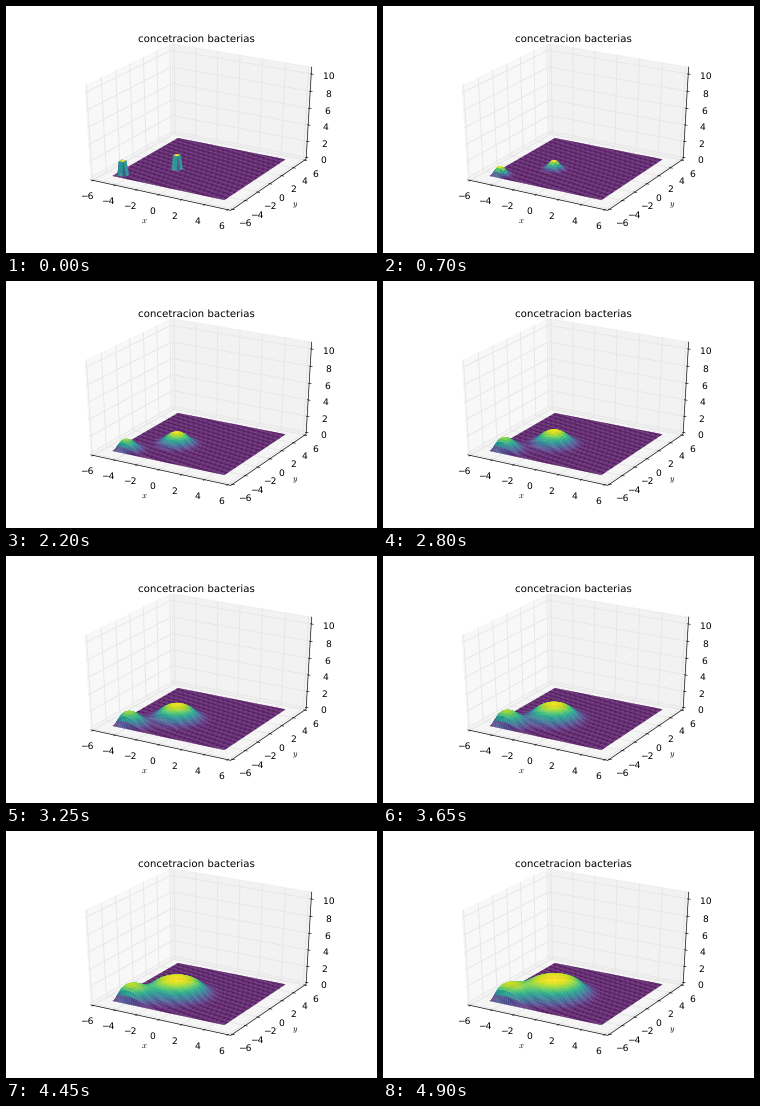
Recreate the animation shown at these times as a matplotlib script. Size 371x247 px, loop 4.95 s.

```python
import numpy as np
import matplotlib.pyplot as plt
from matplotlib import colormaps
from matplotlib.animation import FuncAnimation
from matplotlib.collections import LineCollection, PolyCollection

W, H, DPI = 371, 247, 64
PT = W / 432 * 72 / DPI            # scale of a point on this stage
FRAMES, INTERVAL = 99, 50
Z_TOP = 10.6

plt.rcParams["font.family"] = "DejaVu Sans"
plt.rcParams["text.hinting"] = "no_hinting"
fig = plt.figure(figsize=(W / DPI, H / DPI), dpi=DPI, facecolor="white")
ax = fig.add_axes([0.125, 0.125, 0.775, 0.775])
ax.set_xlim(-0.095, 0.09)
ax.set_ylim(-0.095, 0.09)
ax.set_axis_off()

# --- camera: unit cube centred on the origin, perspective from distance 10
ELEV, AZIM, DIST = np.radians(30), np.radians(-60), 10
TOWARD = np.array([np.cos(AZIM) * np.cos(ELEV), np.sin(AZIM) * np.cos(ELEV), np.sin(ELEV)])
RIGHT = np.array([-np.sin(AZIM), np.cos(AZIM), 0])
UP = np.cross(TOWARD, RIGHT)


def project(p):
    p = np.asarray(p, float)
    depth = DIST - p @ TOWARD
    return np.stack([p @ RIGHT / depth, p @ UP / depth], axis=-1)


# --- box: panes, axes, grid, ticks
DELTA = 1 / 12
EDGE = 0.5 + DELTA / 4
PAD = 48 / (72 * (0.775 * 6 + 0.775 * 4)) * DELTA   # cube units per point
BACK = np.array([-EDGE, EDGE, -EDGE])               # corner where the panes meet


def flipped(p, i):
    q = p.copy()
    q[i] = -q[i]
    return q


def pushed_out(p, along, points):
    step = np.sign(p) * points * PAD
    step[along] = 0
    return p + step


def draw_pane(i, grey):
    a, b = [k for k in range(3) if k != i]
    corners = [BACK, flipped(BACK, a), flipped(flipped(BACK, a), b), flipped(BACK, b)]
    ax.add_collection(PolyCollection([project(corners)], facecolors=[(grey,) * 3 + (0.5,)],
                                     edgecolors=[(grey,) * 3 + (0.5,)],
                                     linewidths=PT, clip_on=False, zorder=1))


def add_lines(lines, color, width, zorder):
    ax.add_collection(LineCollection([project(l) for l in lines], colors=color,
                                     linewidths=width * PT, clip_on=False, zorder=zorder))


def draw_axis(i, side, tick_dir, tick_sign, values, to_unit, name):
    start = flipped(BACK, side)
    end = flipped(start, i)
    add_lines([[start, end]], "black", 0.75, 3)

    grid, ticks = [], []
    for v in values:
        meet = BACK.copy()
        meet[i] = to_unit(v)
        grid.append([flipped(meet, (i + 1) % 3), meet, flipped(meet, (i + 2) % 3)])

        pos = start.copy()
        pos[i] = to_unit(v)
        step = np.zeros(3)
        step[tick_dir] = tick_sign * DELTA
        ticks.append([pos + 0.1 * step, pos - 0.2 * step])

        x, y = project(pushed_out(pos, i, 12))
        ax.text(x, y, str(v).replace("-", "\u2212"), size=10.6 * PT,
                ha="center", va="top", zorder=5)
    add_lines(grid, (0.9, 0.9, 0.9), 1, 2)
    add_lines(ticks, "black", 0.7, 3)

    if name:
        middle = (start + end) / 2
        x, y = project(pushed_out(middle, i, 26))
        ax.text(x, y, f"${name}$", size=10 * PT, ha="center", va="center",
                math_fontfamily="cm", zorder=5)


def plane_unit(v):
    return v / 12


def height_unit(z):
    return z / Z_TOP - 0.5


for i, grey in enumerate((0.95, 0.9, 0.925)):
    draw_pane(i, grey)
draw_axis(0, 1, 1, 1, range(-6, 7, 2), plane_unit, "x")
draw_axis(1, 0, 0, -1, range(-6, 7, 2), plane_unit, "y")
draw_axis(2, 0, 0, -1, range(0, 11, 2), height_unit, "")

ax.annotate("concetracion bacterias", (0.5, 0.92), xycoords="axes fraction",
            xytext=(0, 5 * PT), textcoords="offset points", size=12 * PT,
            ha="center", va="baseline", zorder=5)

# --- two colonies that diffuse and grow logistically, zero on the border
N = 51
STEP = 10 / (N - 1)
DIFFUSION, GROWTH, CAPACITY, START = 0.0043, 0.078, 2.05, 1.7
SUBSTEPS = 2


def simulate():
    u = np.zeros((N, N))
    for row, col in ((3, 3), (19, 18)):
        u[row - 1:row + 2, col - 1:col + 2] = START
    states = [u]
    for _ in range(FRAMES - 1):
        for _ in range(SUBSTEPS):
            core = u[1:-1, 1:-1]
            lap = (u[2:, 1:-1] + u[:-2, 1:-1] + u[1:-1, 2:] + u[1:-1, :-2] - 4 * core) / STEP**2
            rate = DIFFUSION * lap + GROWTH * core * (1 - core / CAPACITY)
            u = np.pad(core + rate / SUBSTEPS, 1)
        states.append(u)
    return states


states = simulate()
X, Y = np.meshgrid(*[plane_unit(np.linspace(-5, 5, N))] * 2)
viridis = colormaps["viridis"]

# soft light hatching of the sheet, slightly steeper than the x direction
row, col = np.mgrid[N - 2:-1:-1, 0:N - 1]
hatch = 0.13 + 0.08 * np.cos(2 * np.pi * (row + 0.2 * col) / 3.3)


def cells(a):
    """Four corners of every cell, farthest row first."""
    quads = np.stack([a[:-1, :-1], a[:-1, 1:], a[1:, 1:], a[1:, :-1]], axis=2)
    return quads[::-1]


surface = PolyCollection([], linewidths=0.3, clip_on=False, zorder=4)
ax.add_collection(surface, autolim=False)


def update(n):
    u = states[n]
    points = project(np.stack([X, Y, height_unit(u)], axis=-1))
    level = cells(u).mean(axis=2)
    level = (level - level.min()) / (level.max() - level.min())
    rgb = viridis(level)[..., :3]
    light = (hatch * (1 - level))[..., None]
    colors = (rgb + (1 - rgb) * light).reshape(-1, 3)
    surface.set_verts(cells(points).reshape(-1, 4, 2))
    surface.set_facecolor(colors)
    surface.set_edgecolor(colors)
    return [surface]


anim = FuncAnimation(fig, update, frames=FRAMES, interval=INTERVAL,
                     repeat=True, repeat_delay=0, blit=False)
plt.show()
```
